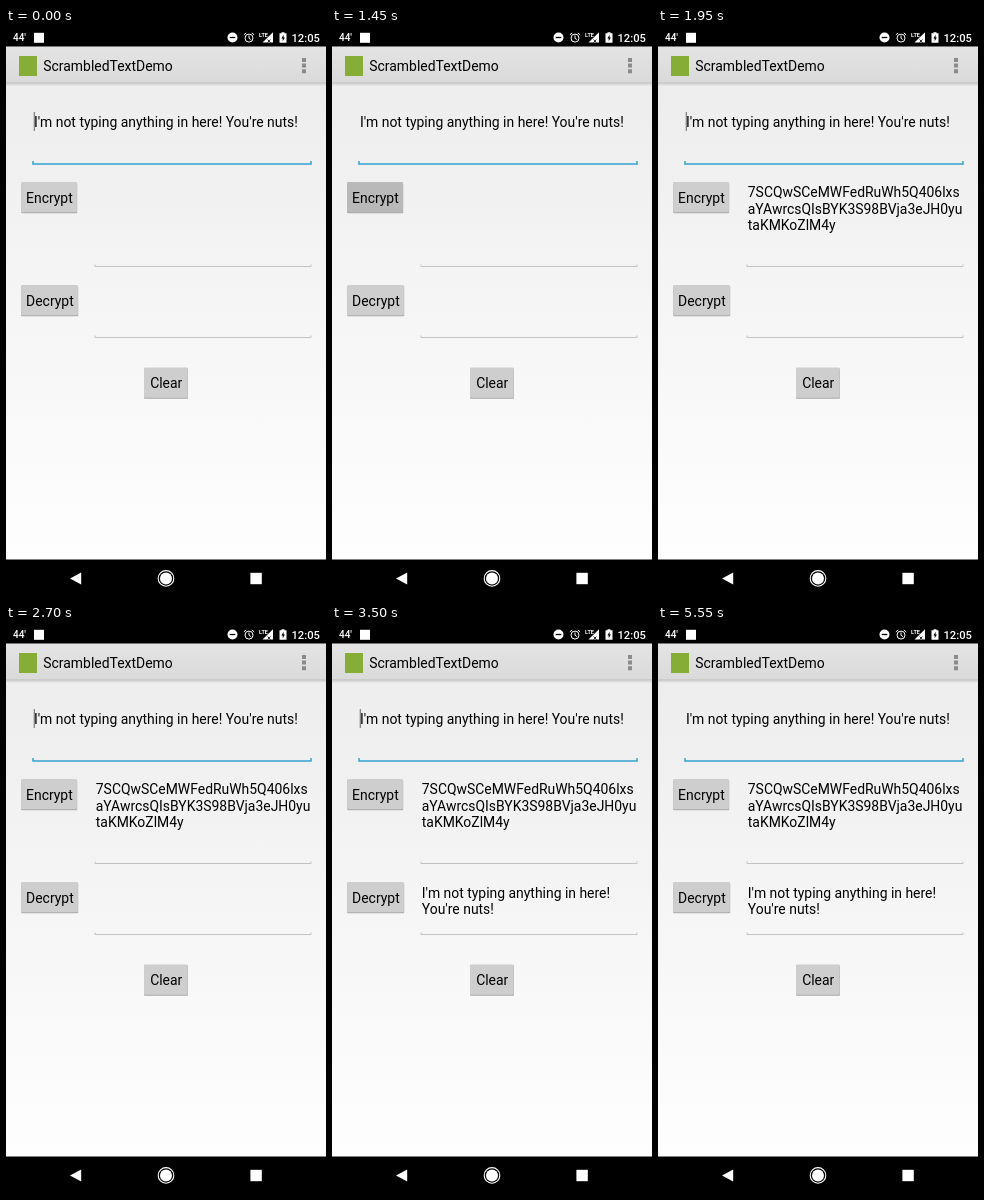
These frames come from a looping animation (320x569 px, 5.6 s). An HTML page:

```html
<!DOCTYPE html>
<html lang="en">
<head>
<meta charset="utf-8">
<title>Text cipher form</title>
<style>
html, body { margin: 0; width: 100%; height: 100%; overflow: hidden; background: #000; }
svg { display: block; width: 100%; height: 100%; }
text { font: 13.93px Roboto, sans-serif; fill: #000; white-space: pre; }
.status text { fill: #fff; }
.line { fill: none; stroke: #c2c2c2; }
</style>
</head>
<body>
<svg viewBox="0 0 320 569" xmlns="http://www.w3.org/2000/svg">
  <defs>
    <linearGradient id="page" x2="0" y2="1">
      <stop stop-color="#ececec"/>
      <stop offset="1" stop-color="#fefefe"/>
    </linearGradient>
    <linearGradient id="bar" x2="0" y2="1">
      <stop stop-color="#e4e4e4"/>
      <stop offset="1" stop-color="#dadada"/>
    </linearGradient>
    <linearGradient id="shade" x2="0" y2="1">
      <stop stop-color="#000" stop-opacity=".12"/>
      <stop offset="1" stop-color="#000" stop-opacity="0"/>
    </linearGradient>
  </defs>

  <rect width="320" height="569"/>
  <rect y="18.7" width="320" height="512.8" fill="url(#page)"/>
  <rect y="18.7" width="320" height="35.8" fill="url(#bar)"/>
  <rect y="54.3" width="320" height="1" fill="#c0c0c0"/>
  <rect y="55.3" width="320" height="3" fill="url(#shade)"/>

  <g class="status" transform="translate(0 .3)">
    <text x="7" y="13" style="font-size:10px;font-weight:500">44'</text>
    <rect x="28" y="4.5" width="10" height="10" fill="#fff"/>
    <circle cx="226.5" cy="9.2" r="5" fill="#fff"/>
    <path d="M223.7 9.2h5.6" stroke="#000" stroke-width="1.3"/>
    <g fill="none" stroke="#fff">
      <circle cx="243" cy="9.8" r="4"/>
      <path d="M243 7.2v2.8l1.8 1.2M237.8 6.6l2.4-2M248.2 6.6l-2.4-2"/>
    </g>
    <text x="253" y="8.5" style="font-size:5.5px;font-weight:700">LTE</text>
    <path d="M256.5 14.2L267 4v10.2z" fill="#fff"/>
    <path d="M261.5 14.2l3-3M261.5 11.2l3 3" stroke="#000" stroke-width=".8"/>
    <path d="M273.5 5h2V4h3v1h2v9.5h-7z" fill="#fff"/>
    <path d="M277.6 6.5l-2.2 3.6h1.3v2.8l2.2-3.7h-1.3z"/>
    <text x="285.5" y="13.4" style="font-size:11.2px;font-weight:500">12:05</text>
  </g>

  <rect x="13" y="28" width="18" height="20" fill="#86ad35"/>
  <text x="37.3" y="42.8">ScrambledTextDemo</text>
  <path d="M296 30h4v4h-4zM296 35.6h4v4h-4zM296 41.2h4v4h-4z" fill="#8b8b8b"/>

  <text x="28" y="98.8">I'm not typing anything in here! You're nuts!</text>
  <rect id="caret" x="27.8" y="84" width=".8" height="19" fill="#444"/>
  <path class="line" d="M27 133v3h278v-3" style="stroke:#33a3d0;stroke-width:1.5"/>
  <path class="line" d="M89 236.5v2h216v-2M89 307.5v2h216v-2"/>

  <g id="cipher">
    <text x="89.8" y="169.2">7SCQwSCeMWFedRuWh5Q406lxs</text>
    <text x="89.8" y="185.6">aYAwrcsQIsBYK3S98BVja3eJH0yu</text>
    <text x="89.8" y="202">taKMKoZlM4y</text>
  </g>
  <g id="plain">
    <text x="89.8" y="272.6">I'm not typing anything in here!</text>
    <text x="89.8" y="289">You're nuts!</text>
  </g>
  <g id="buttons"></g>

  <g fill="#fff" transform="translate(0 .4)">
    <path d="M75.2 544v12L64 550z"/>
    <circle cx="160" cy="550" r="6"/>
    <circle cx="160" cy="550" r="7.8" fill="none" stroke="#fff" stroke-width="1.1"/>
    <rect x="244.4" y="544.4" width="11.4" height="11.4"/>
  </g>
</svg>
<script>
const LOOP = 5600;
const CARET_ON = [[0, 200], [700, 1150], [1650, 2150], [2700, 3550], [4050, 4550]];
const ENCRYPT = [1450, 1950];
const DECRYPT = [3000, 3500];

const el = id => document.getElementById(id);
const within = (t, [from, to]) => t >= from && t < to;
const show = (id, on) => el(id).setAttribute('visibility', on ? 'visible' : 'hidden');

function addButton(id, label, x, y, w) {
  el('buttons').insertAdjacentHTML('beforeend', `
    <rect x="${x}" y="${y + 1}" width="${w}" height="30.2" rx="1" fill="#a8a8a8"/>
    <rect id="${id}" x="${x}" y="${y}" width="${w - .3}" height="30.2" rx="1"/>
    <text x="${x + w / 2 + .2}" y="${y + 20.9}" text-anchor="middle">${label}</text>`);
}

function press(id, down) {
  el(id).setAttribute('fill', down ? '#b9b9b9' : '#cecece');
}

function draw(t) {
  show('caret', CARET_ON.some(span => within(t, span)));
  show('cipher', t >= ENCRYPT[1]);
  show('plain', t >= DECRYPT[1]);
  press('encrypt', within(t, ENCRYPT));
  press('decrypt', within(t, DECRYPT));
}

addButton('encrypt', 'Encrypt', 15.2, 154, 56);
addButton('decrypt', 'Decrypt', 15.2, 257, 57);
addButton('clear', 'Clear', 138, 339.5, 44);
press('clear', false);

const start = performance.now();
function tick() {
  draw((performance.now() - start) % LOOP);
  requestAnimationFrame(tick);
}
tick();
</script>
</body>
</html>
```
